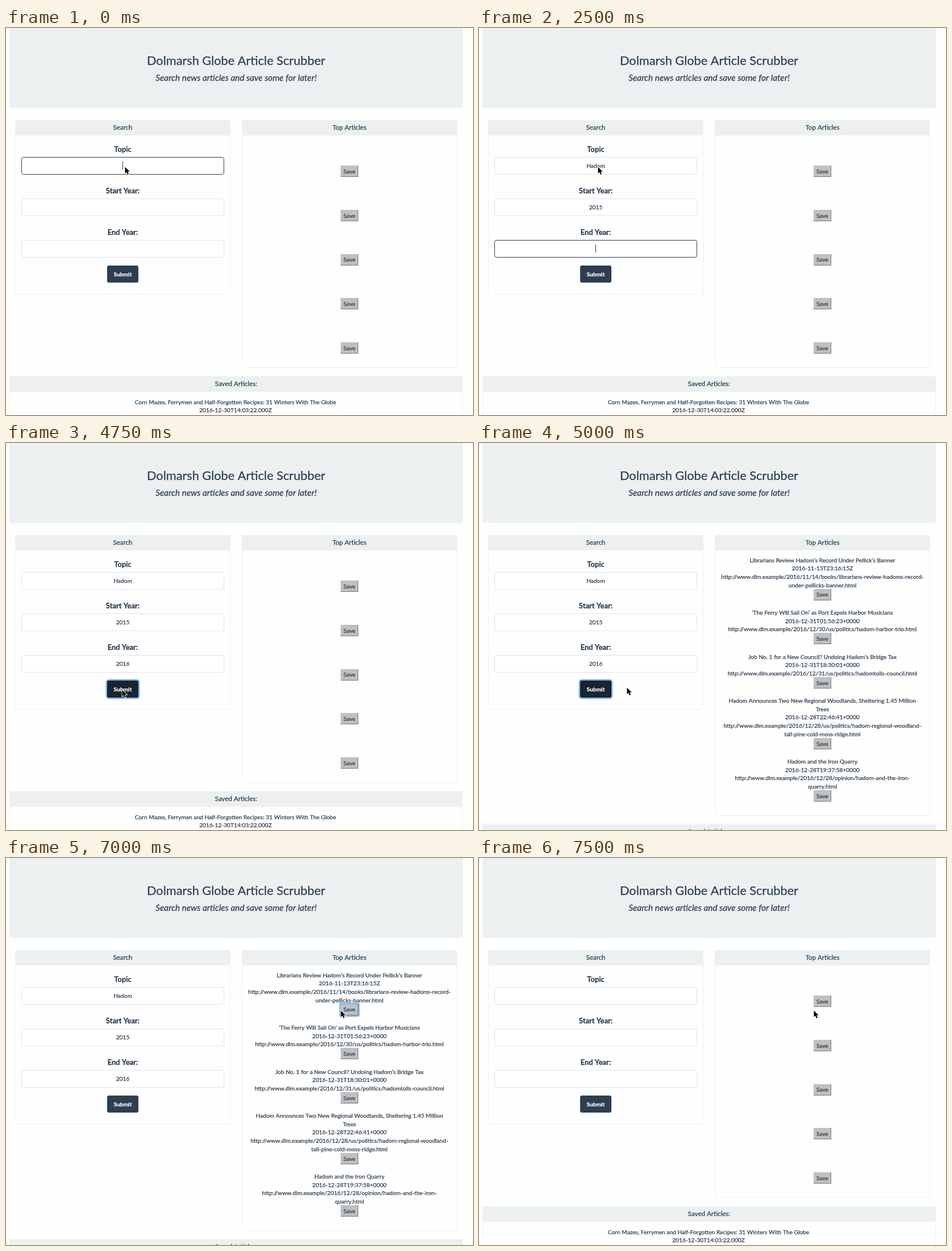
An HTML page with a canvas for the animation above (8000 ms loop, 822 by 681 pixels).

```html
<!DOCTYPE html>
<html lang="en">
<head>
<meta charset="utf-8">
<title>Article Scrubber</title>
<style>
  html, body { margin: 0; overflow: hidden; background: #fefefe; }
  canvas { display: block; }
</style>
</head>
<body>
<canvas id="stage" width="822" height="681"></canvas>
<script>
const ctx = document.getElementById('stage').getContext('2d');
const LOOP = 8000, STEP = 250, LINE = 14.55;
const INK = '#2c3e50', PALE = '#ecf0f1', PAPER = '#fefefe', RING = '#7db9f9';
const BODY = 10.2, HEADING = 11.54, LABEL = 12.9;
const SITE = 'http://www.dlm.example/2016/';

const articles = [
  ['Librarians Review Hadom’s Record Under Pellick’s Banner', '2016-11-13T23:16:15Z',
    SITE + '11/14/books/librarians-review-hadoms-record-', 'under-pellicks-banner.html'],
  ['‘The Ferry Will Sail On’ as Port Expels Harbor Musicians', '2016-12-31T01:56:23+0000',
    SITE + '12/30/us/politics/hadom-harbor-trio.html'],
  ['Job No. 1 for a New Council? Undoing Hadom’s Bridge Tax', '2016-12-31T18:30:01+0000',
    SITE + '12/31/us/politics/hadomtolls-council.html'],
  ['Hadom Announces Two New Regional Woodlands, Sheltering 1.45 Million', 'Trees',
    '2016-12-28T22:46:41+0000',
    SITE + '12/28/us/politics/hadom-regional-woodland-', 'tall-pine-cold-moss-ridge.html'],
  ['Hadom and the Iron Quarry', '2016-12-28T19:37:58+0000',
    SITE + '12/28/opinion/hadom-and-the-iron-', 'quarry.html']
];
const blanks = Array(5).fill(['', '', '']);

const fields = [
  { label: 'Topic', value: 'Hadom', start: 0, rate: 1.25, focus: [0, 1500] },
  { label: 'Start Year:', value: '2015', start: 1750, rate: 2, focus: [1500, 2500] },
  { label: 'End Year:', value: '2016', start: 2500, rate: 2, focus: [2500, 4250] }
];

// Pointer stops: time, x, y
const path = [
  [0, 209, 244], [3000, 209, 244], [4000, 204, 434], [4750, 204, 434],
  [5000, 260, 430], [5500, 312, 424], [6750, 589, 268], [LOOP, 589, 268]
];

const within = (t, [from, to]) => t >= from && t < to;

function box(x, y, w, h, r, fill, stroke, lineWidth = 1) {
  ctx.beginPath();
  ctx.roundRect(x, y, w, h, r);
  if (fill) { ctx.fillStyle = fill; ctx.fill(); }
  if (stroke) { ctx.strokeStyle = stroke; ctx.lineWidth = lineWidth; ctx.stroke(); }
}

// Text centred on x, with its capitals centred on y; the hairline thickens the strokes
function text(str, x, y, size = BODY, style = '', color = INK) {
  const baseline = y + size * 0.36;
  ctx.font = `${style} ${size}px Lato, sans-serif`;
  ctx.fillStyle = ctx.strokeStyle = color;
  ctx.lineWidth = 0.25;
  ctx.fillText(str, x, baseline);
  ctx.strokeText(str, x, baseline);
}

function panel(title, x, y, w, h) {
  box(x + 0.5, y + 0.5, w - 1, h - 1, 3, PAPER, PALE);
  box(x, y, w, 27, [3, 3, 0, 0], PALE);
  text(title, x + w / 2, y + 13.2, HEADING);
}

function field({ label, value, start, rate, focus }, i, t) {
  const y = 227 + i * 73, x = 205.5;
  const focused = within(t, focus);
  const count = t < 7250 ? Math.max(0, Math.floor((t - start) / STEP * rate)) : 0;
  const typed = value.slice(0, count);
  text(label, x, y - 14 + i * 0.2, LABEL, 'bold');
  box(27.5, y + 0.5, 356, 30, 3, '#fff', focused ? INK : '#dce4ec');
  text(typed, x, y + 15.3);
  if (focused) {
    const end = x + ctx.measureText(typed).width / 2;
    ctx.fillRect(Math.floor(end), y + 8, 1, 14);
  }
}

function submitButton(t) {
  const hover = within(t, [4000, 7000]);
  if (within(t, [4250, 7000])) box(177, 417, 57, 32, 4, null, RING, 3);
  box(178, 418, 55, 30, 3, hover ? '#1a242f' : INK);
  text('Submit', 205.5, 433, BODY, 'bold', '#fff');
}

function saveButton(y, focused) {
  const top = Math.round(y - 10);
  if (focused) box(588, top - 1, 33, 22, 2, null, RING, 3);
  box(589, top, 31, 20, 0, '#c0c0c0');
  ctx.fillStyle = '#777';
  ctx.fillRect(619, top, 1, 20);
  ctx.fillRect(589, top + 19, 31, 1);
  text('Save', 604.5, y);
}

function results(list, t) {
  const height = list.reduce((sum, lines) => sum + lines.length * LINE + 34, 0);
  const bottom = Math.round(209.7 + height);
  panel('Top Articles', 415, 162, 379, bottom - 162);
  let y = 206.2;
  list.forEach((lines, i) => {
    for (const line of lines) {
      text(line, 604.5, y);
      y += LINE;
    }
    saveButton(y + 2.4, i === 0 && within(t, [7000, 7250]));
    y += 34;
  });
  return bottom;
}

function page(t) {
  box(6, -5, 798, 145.5, 4, PALE);
  text('Dolmarsh Globe Article Scrubber', 405, 57, 21.73);
  text('Search news articles and save some for later!', 405, 87.5, 15.35, 'italic');

  panel('Search', 16, 162, 379, 307);
  fields.forEach((f, i) => field(f, i, t));
  submitButton(t);

  const top = results(within(t, [5000, 7250]) ? articles : blanks, t) + 15;
  panel('Saved Articles:', 6, top, 798, 150);
  text('Corn Mazes, Ferrymen and Half-Forgotten Recipes: 31 Winters With The Globe', 404, top + 45);
  text('2016-12-30T14:03:22.000Z', 404, top + 59.5);
}

function pointer(t) {
  const i = path.findIndex(stop => stop[0] > t);
  const [t0, x0, y0] = path[i - 1], [t1, x1, y1] = path[i];
  const p = (t - t0) / (t1 - t0), ease = p * p * (3 - 2 * p);
  ctx.save();
  ctx.translate(x0 + (x1 - x0) * ease, y0 + (y1 - y0) * ease);
  const arrow = new Path2D('M.5 .5V12L3.1 9.6 5 13.9 7 13 5.1 8.8H8.7Z');
  ctx.strokeStyle = '#fff';
  ctx.lineWidth = 1.6;
  ctx.stroke(arrow);
  ctx.fillStyle = '#000';
  ctx.fill(arrow);
  ctx.restore();
}

function draw(now) {
  const t = Math.floor(now % LOOP / STEP) * STEP;
  ctx.fillStyle = PAPER;
  ctx.fillRect(0, 0, 822, 681);
  ctx.textAlign = 'center';
  if (!within(t, [7250, 7500])) page(t);
  pointer(t);
  requestAnimationFrame(draw);
}
requestAnimationFrame(draw);
</script>
</body>
</html>
```
